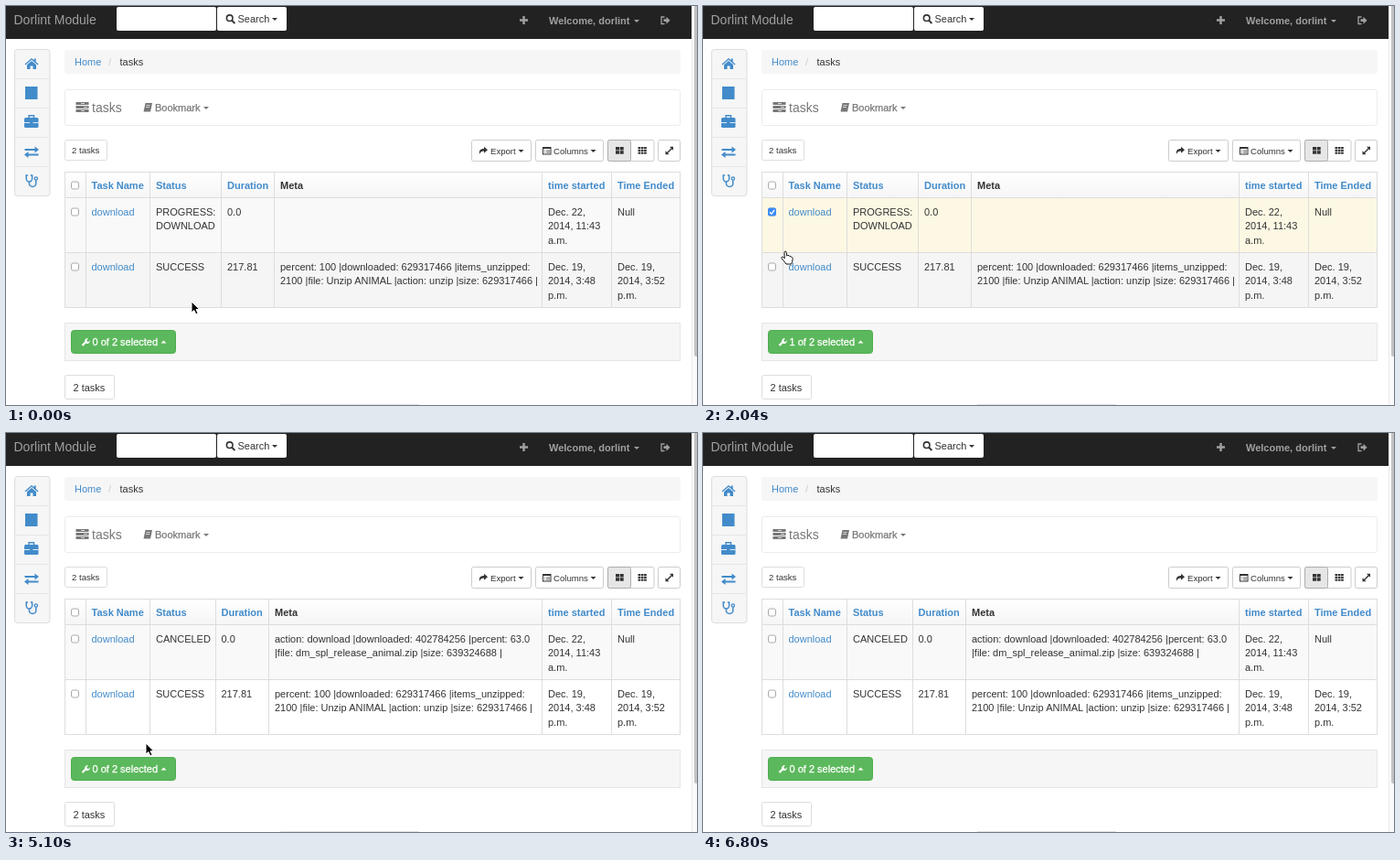
An HTML page that plays this animation: 756x436 px, repeating every 6970 ms.

```html
<!DOCTYPE html>
<html lang="en">
<head>
<meta charset="utf-8">
<title>Task list</title>
<style>
  html, body { margin: 0; width: 100%; height: 100%; overflow: hidden; background: #fff; }
  svg { display: block; width: 756px; height: 436px; }
  text { font-family: "Liberation Sans", Arial, sans-serif; white-space: pre; }
</style>
</head>
<body>
<svg id="stage" viewBox="0 0 756 436"></svg>
<script>
const STEP = 170, LOOP = 6970;
const BLUE = '#428bca', INK = '#333', LINE = '#ddd';
const CHECK_AT = 1870, MENU_OPEN = 3060, MENU_CLICK = 4250, MENU_CLOSE = 4420, RELOAD = 5100;

const text = (x, y, s, { size = 11, fill = INK, bold = false, heavy = 0 } = {}) =>
  `<text x="${x}" y="${y}" font-size="${size}" fill="${fill}"` +
  (bold ? ' font-weight="700"' : '') +
  (heavy ? ` stroke="${fill}" stroke-width="${heavy}"` : '') + `>${s}</text>`;

const box = (x, y, w, h, fill = '#fff', stroke = 'none', r = 0, extra = '') =>
  `<rect x="${x}" y="${y}" width="${w}" height="${h}" rx="${r}" fill="${fill}" stroke="${stroke}" ${extra}/>`;

const shape = (d, fill = INK, extra = '') => `<path d="${d}" fill="${fill}" ${extra}/>`;
const stroke = (d, color = INK, width = 1) =>
  shape(d, 'none', `stroke="${color}" stroke-width="${width}"`);
const caret = (x, y, fill = INK, dir = 1) => shape(`M${x} ${y}h6l-3 ${3 * dir}z`, fill);
const group = (id, body) => `<g id="${id}">${body}</g>`;

function navbar() {
  const grey = '#a0a0a0';
  return box(0, 0, 750, 36, '#222') +
    text(8.5, 20, 'Dorlint Module', { size: 14, fill: grey }) +
    box(121, 1, 109, 26, '#fff', 'none', 2) + box(231, 1, 76, 26, '#fff', 'none', 2) +
    '<circle cx="244.7" cy="13.2" r="3.3" fill="none" stroke="#333" stroke-width="1.6"/>' +
    stroke('M247 15.6l3.4 3.4', INK, 2) +
    text(253.5, 18, 'Search') + caret(291, 13) +
    stroke('M562 15.5h9M566.5 11v9', grey, 2.4) +
    text(594, 20, 'Welcome, dorlint', { fill: grey, bold: true }) + caret(687, 15, grey) +
    stroke('M720.5 12h-3.5v7.500h3.500', grey, 1.3) +
    shape('M719.500 14.300h3v-2.600l4 4-4 4v-2.600h-3z', grey);
}

function sidebar() {
  let out = box(9.5, 47.5, 38.500, 160, '#f6f6f6', LINE, 3);
  for (let y = 79.5; y < 200; y += 32) out += stroke(`M10 ${y}h37.500`, '#e6e6e6');
  return out +
    shape('M20.500 63.500L28 57l2.700 2.300V57.500h2v3.500l2.800 2.500-.9 1L28 58.800l-6.600 5.700z', BLUE) +
    shape('M23 64.300l5-4.300 5 4.300V69h-3.500v-3.500h-3V69H23z', BLUE) +
    box(21, 88, 13.500, 14, BLUE) +
    box(20, 122, 15.500, 11, BLUE, 'none', 1.5) +
    stroke('M25 122v-2.200h5.500v2.200', BLUE, 1.4) +
    stroke('M20 127.500h6M29.500 127.500h6', '#f6f6f6', .9) +
    stroke('M20.500 157h12M23.500 162.500h12', BLUE, 1.8) +
    shape('M31.500 153.500l4.500 3.500-4.500 3.500zM24.500 159l-4.500 3.500 4.500 3.500z', BLUE) +
    stroke('M24 185h-1.800v3.500a3.200 3.500 0 0 0 6.400 0V185h-1.800M25.400 192v2.200a3.700 3.200 0 0 0 7.400 0v-4', BLUE, 1.5) +
    `<circle cx="32.800" cy="188.500" r="1.700" fill="none" stroke="${BLUE}" stroke-width="1.300"/>`;
}

function heading() {
  const grey = '#777';
  let bars = '';
  for (let i = 0; i < 3; i++) {
    const y = 105 + i * 4;
    bars += box(76.5, y, 14, 3, grey) + box(82 + (i % 2) * 3, y + 1, 4, 1, '#ddd');
  }
  return box(64, 48, 674, 26, '#f6f6f6', 'none', 3) +
    text(75, 65, 'Home', { fill: BLUE }) + text(112, 65, '/', { fill: '#ccc' }) + text(124.5, 65, 'tasks') +
    box(64.5, 91.5, 673, 39, '#fff', '#ececec', 2) + bars +
    text(94, 115.500, 'tasks', { size: 14, fill: grey }) +
    shape('M152.500 106h7.500l-2 9.500h-7.500z', grey) + stroke('M153.500 108.500h4M153 110.500h4', '#fff', .7) +
    text(163, 115, 'Bookmark', { fill: grey, heavy: .25 }) + caret(216, 110, grey);
}

function toolbar() {
  const small = { size: 9.6 };
  let grid = '';
  for (let i = 0; i < 4; i++) grid += box(667 + (i % 2) * 4.700, 154 + (i >> 1) * 4.200, 4, 3.500, INK);
  for (let i = 0; i < 9; i++) grid += box(691.5 + (i % 3) * 3.300, 154 + Math.floor(i / 3) * 2.800, 2.700, 2.100, INK);
  return box(64.5, 146.5, 46, 22, '#fff', LINE, 2) + text(72, 160.500, '2 tasks', small) +
    box(509.5, 146.5, 65, 23, '#fff', '#ccc', 2) +
    shape('M518 162c-.8-4 1-6 5-6v-2.300l4 3.500-4 3.500v-2.200c-3 0-4 1-5 3.500z') +
    text(530, 161.500, 'Export', small) + caret(560.5, 157) +
    box(579.5, 146.5, 74, 23, '#fff', '#ccc', 2) +
    box(587.5, 154.5, 8.500, 7.500, '#fff', INK) + stroke('M587.500 155h8.500', INK, 2) +
    stroke('M589 158h1M591 158h4M589 160h1M591 160h4', INK, .8) +
    text(599, 161.500, 'Columns', small) + caret(639.5, 157) +
    box(658.5, 146.5, 50.500, 23, '#fff', '#ccc', 2) +
    box(658.5, 146.5, 25, 23, '#e6e6e6', '#adadad', 2) + grid +
    box(713.5, 146.5, 24, 23, '#fff', '#ccc', 2) +
    stroke('M723 161l5.500-5.500', INK, 1.4) + shape('M730 153.800v4l-4-4zM721.500 162.300v-4l4 4z');
}

function checkbox(y, checked) {
  return checked
    ? box(71, y - 4.500, 9, 9, '#3c8bf5', 'none', 2) + stroke(`M73 ${y + .2}l2 2 3.200-4.400`, '#fff', 1.3)
    : box(71.5, y - 4, 8, 8, '#fff', '#aaa', 2);
}

function cells(cols, y, values) {
  return values.map((value, i) => value.split('\n').map((line, n) =>
    text(cols[i] + 6.5, y + n * 15.600, line, { fill: i ? INK : BLUE })).join('')).join('');
}

// Column edges follow the widest status text.
function table(statusEnd, durationEnd, first) {
  const cols = [87, 157.5, statusEnd, durationEnd, 586.5, 662.5];
  const titles = ['Task Name', 'Status', 'Duration', 'Meta', 'time started', 'Time Ended'];
  const second = ['download', 'SUCCESS', '217.81',
    'percent: 100 |downloaded: 629317466 |items_unzipped:\n2100 |file: Unzip ANIMAL |action: unzip |size: 629317466 |',
    'Dec. 19,\n2014, 3:48\np.m.', 'Dec. 19,\n2014, 3:52\np.m.'];
  return cols.map(x => stroke(`M${Math.floor(x) + .5} 181v149`, LINE)).join('') +
    titles.map((s, i) => text(cols[i] + 6.5, 199.500, s, { bold: true, fill: i === 3 ? INK : BLUE })).join('') +
    cells(cols, 228.500, first) + cells(cols, 288.500, second);
}

const started = 'Dec. 22,\n2014, 11:43\na.m.';

function tableBase() {
  return '<defs><linearGradient id="head" x2="0" y2="1"><stop stop-color="#fff"/>' +
    '<stop offset="1" stop-color="#f5f5f5"/></linearGradient></defs>' +
    box(64.5, 181.5, 673, 28.500, 'url(#head)') +
    box(64.5, 210, 673, 60, '#f9f9f9', 'none', 0, 'id="row1"') +
    box(64.5, 270, 673, 60, '#fff', 'none', 0, 'id="row2"') +
    box(64.5, 181.5, 673, 148, 'none', LINE) +
    stroke('M64.500 209.500h673M64.500 269.500h673', LINE);
}

function footer() {
  return box(64.5, 346.5, 673, 41, '#f6f6f6', '#e5e5e5') +
    box(71.5, 354.5, 114, 25, '#5cb85c', '#4cae4c', 3, 'id="button"') +
    stroke('M83.500 371l4.500-4.500', '#fff', 2.3) +
    shape('M86.500 367.500c-1-2.500.7-4.800 3.500-4.500l-1.700 1.900.4 1.600 1.700.4 1.500-1.700c.3 2.500-2 4.300-4 3.500z', '#fff') +
    '<text id="count" x="94.500" y="371" font-size="11" fill="#fff" stroke="#fff" stroke-width=".3"></text>' +
    caret(169.5, 368.500, '#fff', -1) +
    box(64.5, 403.5, 54, 26, '#fff', LINE, 2) + text(73.5, 420.500, '2 tasks') +
    box(300, 435, 152, 1, '#e2e2e2') +
    box(750, 0, 6, 436, '#fafafa') + stroke('M750.500 0v436', '#ececec') +
    box(753, -5, 5, 388, '#c2c2c2', 'none', 2);
}

function menu() {
  return box(71, 306, 150, 51, '#000', 'none', 4, 'opacity=".06"') +
    box(70.5, 304, 150, 51, '#000', 'none', 4, 'opacity=".06"') +
    box(72, 304, 147, 48, '#fff', '#ccc', 3) +
    box(72.5, 328, 146, 20, '#f5f5f5', 'none', 0, 'id="item"') +
    stroke('M89 315l6 6M95 315l-6 6', INK, 2.300) +
    text(99.5, 321.500, 'Delete selected tasks') + text(88, 341.500, 'Cancel Running Task');
}

function pointers() {
  const edge = 'stroke-linejoin="round" stroke-width="1"';
  return '<circle id="ring" r="23" fill="none" stroke="#111" stroke-width="2"/>' +
    shape('M0 0v12l2.800-2.500 2 4.300 2.200-1-2-4.200h3.800z', '#000', `id="arrow" stroke="#fff" ${edge}`) +
    shape('M-1 1.200c0-1.600 2-1.600 2.200 0l.6 4 .8-.8 1.500.2.6.8 1.400.1.500.9c1.200 0 1.600.8 1.500 2l-.5 3.300-1 2.300H1L-1.600 10.500-4 7.700c-.6-1.300.8-2 1.800-1.200l1.500 1.200z',
      '#fff', `id="hand" stroke="#111" ${edge}`);
}

const stage = document.getElementById('stage');
stage.innerHTML = box(0, 0, 756, 436) + navbar() + sidebar() + heading() + toolbar() + tableBase() +
  group('running', table(235.5, 293.5, ['download', 'PROGRESS:\nDOWNLOAD', '0.0', '', started, 'Null'])) +
  group('canceled', table(229, 287.5, ['download', 'CANCELED', '0.0',
    'action: download |downloaded: 402784256 |percent: 63.0\n|file: dm_spl_release_animal.zip |size: 639324688 |',
    started, 'Null'])) +
  checkbox(196, false) + checkbox(225, false) + checkbox(285, false) +
  group('checked', checkbox(225, true)) +
  footer() + group('menu', menu()) + pointers();

const part = Object.fromEntries([...stage.querySelectorAll('[id]')].map(el => [el.id, el]));
const show = (el, on) => el.setAttribute('display', on ? 'inline' : 'none');
const paint = (el, fill) => el.setAttribute('fill', fill);

// Pointer stops: time, x, y
const stops = [
  [0, 203, 323], [850, 203, 323], [1700, 103, 278], [CHECK_AT, 76, 224], [2040, 90, 268],
  [2890, 170, 369], [3400, 170, 369], [4080, 153, 339], [5440, 153, 339], [6290, 150, 440], [LOOP, 150, 440]
];

function pointerAt(t) {
  const i = stops.findIndex(s => s[0] > t);
  const [t0, x0, y0] = stops[i - 1], [t1, x1, y1] = stops[i];
  const u = (t - t0) / (t1 - t0), k = u * u * (3 - 2 * u);
  return [x0 + (x1 - x0) * k, y0 + (y1 - y0) * k];
}

function render(ms) {
  const t = Math.floor(ms % LOOP / STEP) * STEP;
  const [x, y] = pointerAt(t);
  const within = (a, b) => t >= a && t < b;
  const selected = within(CHECK_AT, RELOAD), open = within(MENU_OPEN, MENU_CLOSE);
  const onButton = x > 71 && x < 186 && y > 354 && y < 380;
  const hand = onButton || within(2040, 2210);

  show(part.running, t < RELOAD);
  show(part.canceled, t >= RELOAD);
  show(part.checked, selected);
  paint(part.row1, selected ? '#fcf8e3' : '#f9f9f9');
  paint(part.row2, !open && y > 266 && y < 330 ? '#f5f5f5' : '#fff');
  paint(part.button, onButton || open ? '#47a447' : '#5cb85c');
  part.count.textContent = `${selected ? 1 : 0} of 2 selected`;

  show(part.menu, open);
  show(part.item, y > 328 && y < 348);
  show(part.ring, [CHECK_AT, MENU_OPEN, MENU_CLICK].some(c => within(c, c + STEP)));
  show(part.arrow, !hand);
  show(part.hand, hand);
  for (const el of [part.ring, part.arrow, part.hand]) el.setAttribute('transform', `translate(${x} ${y})`);
}

const begin = performance.now();
function tick() {
  render(performance.now() - begin);
  requestAnimationFrame(tick);
}
tick();
</script>
</body>
</html>
```
